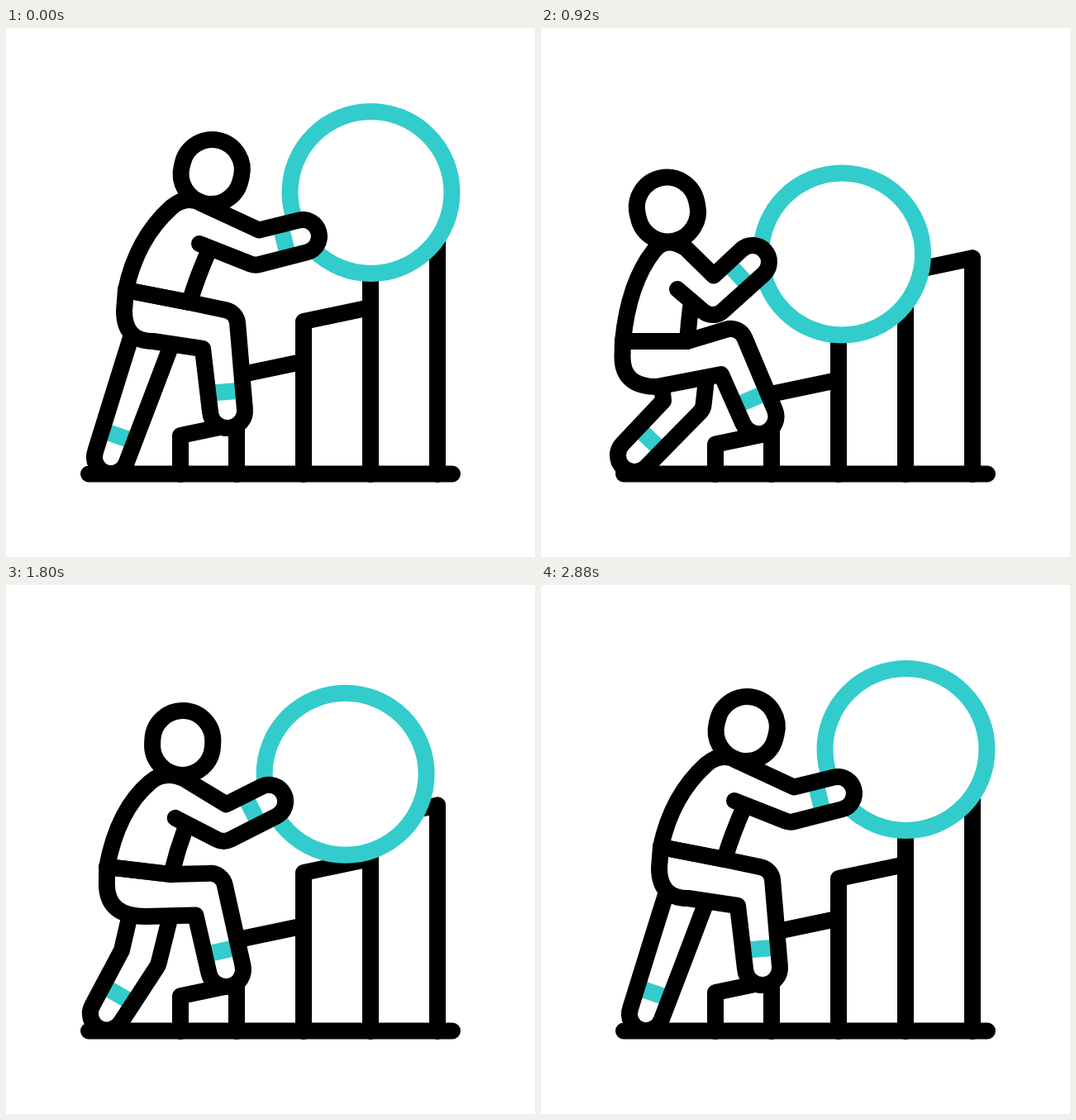
An HTML page with a canvas for the animation above (3.22 s loop, 640 by 640 pixels).

```html
<!DOCTYPE html>
<html>
<head>
<meta charset="utf-8">
<style>
  html, body { margin: 0; width: 100%; height: 100%; overflow: hidden; background: #fff; }
  canvas { display: block; width: 640px; height: 640px; }
</style>
</head>
<body>
<canvas id="stage" width="640" height="640"></canvas>
<script>
const ctx = document.getElementById('stage').getContext('2d');
const TEAL = '#33cccc';
const LOOP = 3220;

// How far the ball has rolled back (0 = top, 1 = lowest) over time in ms.
const ROLL = [
  [200, 0], [300, .05], [392, .208], [480, .41], [600, .65], [740, .844], [920, .9675],
  [1080, .995], [1180, 1], [1280, .973], [1400, .895], [1500, .79], [1650, .59], [1800, .387],
  [1950, .24], [2100, .135], [2250, .07], [2400, .033], [2600, .01], [2900, 0]
];
const LAST_BAR = [[0, 250], [.385, 266.5], [.65, 267.5], [.79, 275], [1, 278.5]];

// Each entry holds three poses, at roll 0, MID and LOW. Limb ends add an angle in degrees.
const MID = .65, LOW = .9675;
const TORSO = {
  belt: [145, 317, 110, 358, 99, 379],
  back: [158, 255, 121, 287, 106, 308],
  nape: [200, 217, 157, 253, 137, 269],
  shoulder: [219, 201, 173, 237, 152, 251],
  chest: [238, 213, 198, 249, 176, 267],
  elbowIn: [306, 244.5, 240, 280.5, 209, 299.5],
  hand: [359, 252, -14, 290, 270.5, -35, 256, 283, -43],
  elbowOut: [301, 287.5, 238, 330, 208, 353],
  armpit: [234, 261, 186, 297, 165, 316],
  front: [246, 268, 200, 312, 181, 338],
  waist: [222, 332, 188, 363, 177, 379],
  head: [248.7, 174, 14, 187.3, 203.5, -4, 153, 219.5, -13]
};
const LEGS = {
  knee: [279, 344, 251, 353, 240, 360],
  foot: [268, 463, 85.3, 264.8, 467, 72.5, 263.5, 470, 67],
  kneePit: [238, 388, 224, 408, 218, 419],
  seat: [178, 379, 158, 416, 140, 434],
  hip: [143, 342, 110, 377, 98.5, 398],
  thighFront: [199, 386, 199, 412, 200, 425],
  shinFront: [174, 452, 190, 462, 196, 461],
  rearFoot: [127, 519, 109, 118, 518, 127, 113, 517, 134],
  shinBack: [133, 432, 144, 447, 148, 451],
  thighBack: [153, 368, 148, 420, 147, 440]
};

// Smooth interpolation through keys without overshoot.
function curve(keys, t) {
  const n = keys.length - 1;
  if (t <= keys[0][0]) return keys[0][1];
  if (t >= keys[n][0]) return keys[n][1];
  const i = keys.findIndex(k => k[0] > t) - 1;
  const slope = j => j < 0 || j >= n ? 0 : (keys[j + 1][1] - keys[j][1]) / (keys[j + 1][0] - keys[j][0]);
  const tangent = j => {
    const a = slope(j - 1), b = slope(j);
    return a * b > 0 ? 2 * a * b / (a + b) : 0;
  };
  const w = keys[i + 1][0] - keys[i][0], s = (t - keys[i][0]) / w, r = 1 - s;
  return keys[i][1] * (1 + 2 * s) * r * r + keys[i + 1][1] * s * s * (3 - 2 * s)
    + w * s * r * (tangent(i) * r - tangent(i + 1) * s);
}

function pose(parts, p) {
  const a = (p - MID) * (p - LOW) / (MID * LOW);
  const b = p * (p - LOW) / (MID * (MID - LOW));
  const c = p * (p - MID) / (LOW * (LOW - MID));
  const result = {};
  for (const name in parts) {
    const v = parts[name], n = v.length / 3;
    result[name] = v.slice(0, n).map((x, i) => a * x + b * v[i + n] + c * v[i + 2 * n]);
  }
  return result;
}

const polar = ([x, y, deg], dist, turn = 0) => {
  const a = (deg + turn) * Math.PI / 180;
  return [x + dist * Math.cos(a), y + dist * Math.sin(a)];
};

function line(...points) {
  const path = new Path2D();
  points.forEach(pt => path.lineTo(...pt));
  return path;
}

function roundEnd(path, end, r) {
  const a = end[2] * Math.PI / 180;
  path.arc(end[0], end[1], r, a - Math.PI / 2, a + Math.PI / 2);
}

function stroke(path, color = '#000', cap = 'round') {
  ctx.strokeStyle = color;
  ctx.lineCap = cap;
  ctx.stroke(path);
}

function shape(path, color) {
  ctx.fill(path);
  stroke(path, color);
}

function limb(path, end, cuffDist) {
  ctx.fill(path);
  const cuff = [...polar(end, -cuffDist), end[2]];
  stroke(line(polar(cuff, 20, -90), polar(cuff, 20, 90)), TEAL, 'butt');
  stroke(path);
}

function drawBars(p) {
  const bar = (x, y, w) => stroke(line([x, 540], [x, y], [x + w, y - w * .21]));
  bar(211, 493 + 11 * p, 68);
  bar(279, 420.5 + 23 * p, 81);
  bar(360, 355 - 18 * p, 81);
  const top = curve(LAST_BAR, p);
  bar(441, top + 17, 81);
  stroke(line([522, top], [522, 540]));
  stroke(line([100, 539.5], [540, 539.5]));
}

function drawBall(p) {
  const ball = new Path2D();
  ball.arc(441.5 - 80 * p, 199 + 77 * p, 98, 0, 7);
  shape(ball, TEAL);
}

function drawLegs(g, belt, waist) {
  const rear = line(g.thighFront);
  rear.arcTo(...g.shinFront, ...polar(g.rearFoot, 20, -90), 15);
  roundEnd(rear, g.rearFoot, 20);
  rear.lineTo(...g.shinBack);
  rear.lineTo(...g.thighBack);
  limb(rear, g.rearFoot, 27);

  const pants = line(belt, waist);
  pants.arcTo(...g.knee, ...polar(g.foot, 21, -90), 18);
  roundEnd(pants, g.foot, 21);
  pants.lineTo(...g.kneePit);
  pants.lineTo(...g.seat);
  pants.quadraticCurveTo(g.hip[0], g.seat[1], ...g.hip);
  pants.closePath();
  limb(pants, g.foot, 23);
}

function drawTorso(b) {
  const body = line(b.belt);
  body.quadraticCurveTo(...b.back, ...b.nape);
  body.quadraticCurveTo(...b.shoulder, ...b.chest);
  body.lineTo(...b.elbowIn);
  roundEnd(body, b.hand, 20);
  body.arcTo(...b.elbowOut, ...b.armpit, 18);
  body.lineTo(...b.armpit);
  limb(body, b.hand, 23);

  const [fx, fy] = b.front, [wx, wy] = b.waist;
  const front = line(b.front);
  front.quadraticCurveTo(fx * .4 + wx * .6, (fy + wy) / 2, wx, wy);
  stroke(front);
  stroke(line(b.belt, b.waist));
}

function drawHead([x, y, tilt]) {
  const head = new Path2D();
  head.roundRect(-36.5, -39, 73, 78, 36.5);
  ctx.save();
  ctx.translate(x, y);
  ctx.rotate(tilt * Math.PI / 180);
  shape(head);
  ctx.restore();
}

function draw(now) {
  const p = curve(ROLL, now % LOOP);
  const torso = pose(TORSO, p);
  ctx.fillStyle = '#fff';
  ctx.fillRect(0, 0, 640, 640);
  ctx.lineWidth = 20;
  ctx.lineJoin = 'round';
  drawBars(p);
  drawBall(p);
  drawLegs(pose(LEGS, p), torso.belt, torso.waist);
  drawTorso(torso);
  drawHead(torso.head);
}

const start = performance.now();
function tick() {
  draw(performance.now() - start);
  requestAnimationFrame(tick);
}
tick();
</script>
</body>
</html>
```
